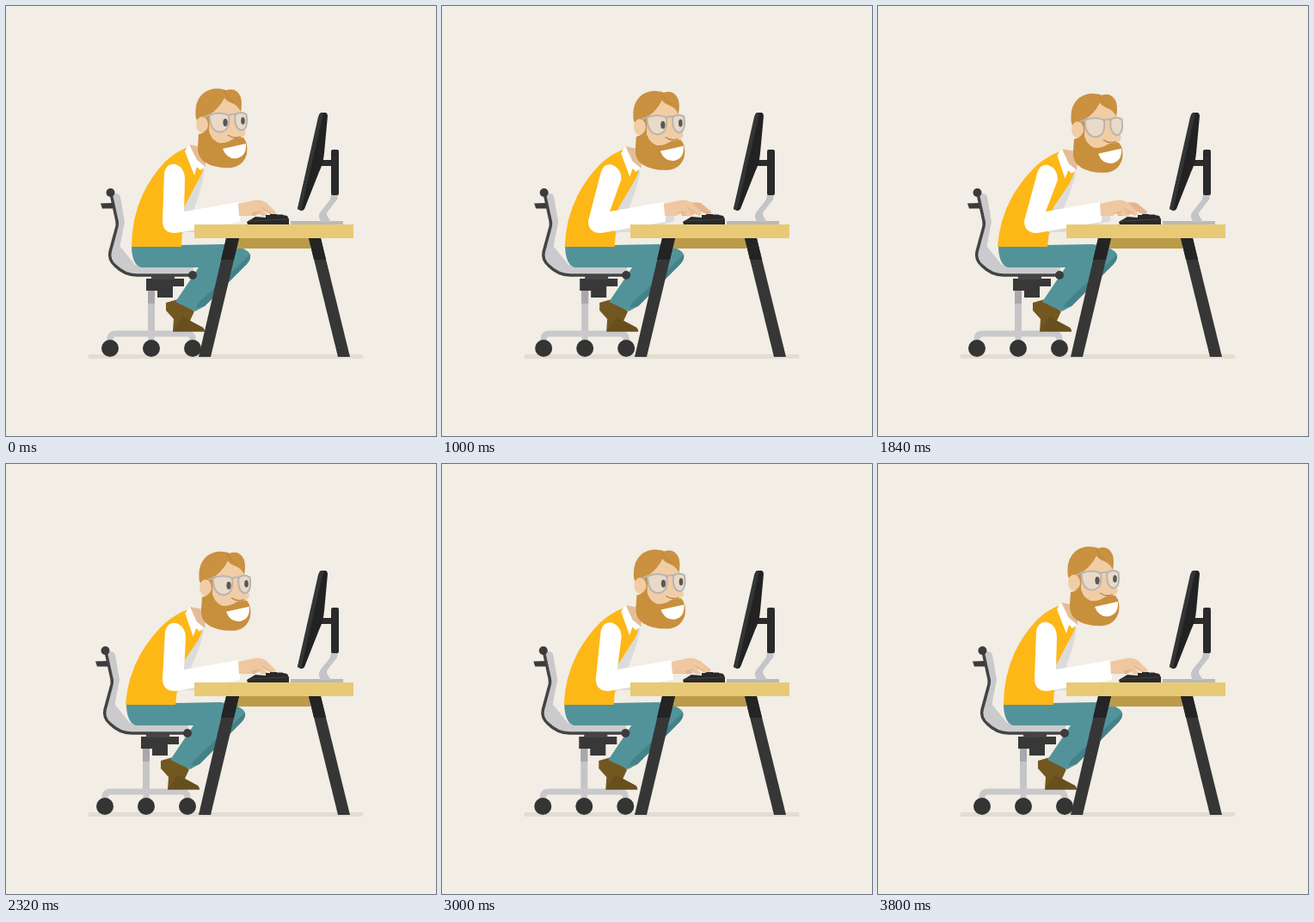
Animation, 500 px wide and 500 px high, one loop 3.84 s. Source, as an HTML page:

```html
<!DOCTYPE html>
<html lang="en">
<head>
<meta charset="utf-8">
<title>At the desk</title>
<style>
html, body { margin: 0; width: 100%; height: 100%; overflow: hidden; background: #f2ede5; }
svg { display: block; width: 100vw; height: 100vh; }
</style>
</head>
<body>
<svg viewBox="0 0 500 500">
  <path d="M98 407.500H413" stroke="#e2dcd1" stroke-width="5" stroke-linecap="round"/>

  <g id="monitor">
    <path d="M331 250H392V254H331Z" fill="#b9b9ba"/>
    <path d="M378 219H386L385 225L374 239Q372 242 374 245L378 251H366L364 246Q363 243 366 239L377 225Z" fill="#c3c4c7"/>
    <rect x="362" y="179" width="20" height="7" fill="#2c2c2d"/>
    <rect x="378" y="167" width="9" height="53" rx="2" fill="#2a2a2b"/>
    <path d="M366 124L372 124Q374 125 374 128L370 171Q369 183 364 193L347 236Q346 238 343 238L339 236Z" fill="#222223"/>
    <path d="M366 124L369 125L343 238L339 236L340 231L363 129Q364 125 366 124Z" fill="#343536"/>
  </g>

  <g id="chair">
    <path d="M124 219Q131 216 133 222L138 251L134 271L131 290Q123 293 123 285L129 255Z" fill="#c9c9cc"/>
    <path d="M122 286L133 280L150 301H218V311H152Q138 311 130 303Q122 296 122 286Z" fill="#cbcbce"/>
    <rect x="165" y="330" width="8" height="50" fill="#c5c5c8"/>
    <path d="M165 331H173V346H165Z" fill="#a8a8ab"/>
    <path d="M121 391V387Q121 381 128 381H210Q217 381 217 387V391M169 380V391" fill="none" stroke="#c9c9cc" stroke-width="7"/>
    <path d="M163 317H207V326H194V339H176V331H163Z" fill="#383839"/>
    <path d="M169 313H196V318H169Z" fill="#454546"/>
    <path d="M122 218L129 250Q130 254 128 260L121 286Q119 295 127 302Q138 313 152 313H216" fill="none" stroke="#434344" stroke-width="3.500"/>
    <circle cx="121.500" cy="217" r="5" fill="#3b3b3c"/>
    <path d="M110 229.500L124 229V235.500H112Z" fill="#3b3b3c"/>
    <g fill="#343435">
      <circle cx="121" cy="398" r="10"/>
      <circle cx="169" cy="398" r="10"/>
      <circle cx="217" cy="398" r="10"/>
    </g>
  </g>

  <g id="legs">
    <path d="M186 345L200 341L219 355L214 366L229 374Q231 376 231 378.500H194L195 364L186 354Z" fill="#735720"/>
    <path d="M206 361L214 366L229 374Q231 376 231 378.500H194L197 373Z" fill="#67501e"/>
    <path d="M146 279L255 277Q274 279 282 286Q287 291 280 300L231 349L220 355L197 344L224 304H157Q146 300 146 279Z" fill="#52939a"/>
    <path d="M284 289Q285 295 280 300L231 349L221 351L225 344Z" fill="#448188"/>
    <circle cx="217" cy="313" r="5" fill="#3b3b3c"/>
  </g>

  <g id="torso">
    <path d="M214 173L231 190Q228 212 218 237L206 265H194Z" fill="#dbdbdc"/>
    <path d="M146 280Q146 247 159 219Q169 198 185 181Q198 169 212 164L229 191Q222 215 206 237L204 280Z" fill="#fdb817"/>
    <path d="M213 160L231 186L226 191L222 187L219 197L208 169Z" fill="#fff"/>
    <path d="M213 161L232 165V187L222 179Z" fill="#e4bd98"/>
  </g>
  <path id="farArm" fill="#dbdbdc"/>

  <g id="head">
    <path d="M233 122L246 108H264L273 119L274 135Q280 146 278 150L270 154L257 172H237L234 146Z" fill="#f1cda6"/>
    <path d="M221 131Q218 111 230 101Q242 93 256 98Q268 94 273 106Q275 114 273 123Q270 116 263 113Q257 111 254 107Q247 120 237 126L236 146H231Z" fill="#c99140"/>
    <path d="M253 97Q257 107 265 112" fill="none" stroke="#bb8233"/>
    <ellipse cx="228" cy="138" rx="7" ry="9.500" fill="#f1cda6"/>
    <path d="M235 141Q237 155 247 159Q254 160 260 157Q268 152 276 153Q282 160 280 172Q276 186 262 188Q243 189 232 182Q222 176 223 163L224 149Q231 148 235 141Z" fill="#c88f3d"/>
    <path d="M252 166L279 160Q280 174 269 177Q257 179 252 166Z" fill="#fff"/>
    <path d="M258 144Q260 153 268 154Q280 153 278 145L272 137H262Z" fill="#f1cda6"/>
    <path d="M258 150Q265 155 273 152" fill="none" stroke="#bd8a50" stroke-width="1.500"/>
    <g stroke="#b8b5b1" stroke-width="2" fill="#e9dac8">
      <path d="M236.500 127Q249 122 259 127Q261 146 249 146.500Q237 146 236.500 127Z"/>
      <path d="M266.500 126Q274 122 279.500 126Q282 143 274 144.500Q265 143 266.500 126Z"/>
      <path d="M231 129L238 126M258 128Q263 124 268 127" fill="none"/>
    </g>
    <g id="eyes" fill="#5c5755">
      <ellipse cx="255" cy="135.500" rx="2.600" ry="4.500"/>
      <ellipse cx="275.500" cy="133.500" rx="2.300" ry="4.300"/>
    </g>
  </g>

  <path id="farHand" d="M276 234Q290 226 301 229L313 239L312 244L299 238L290 244H279Z" fill="#e4b690"/>
  <path id="arm" fill="#fff"/>
  <g id="hand">
    <path d="M270 230L284 227Q295 223 303 229L313 239Q315 243 311 244L298 237L304 243Q302 246 296 243L290 240L285 244L271 244Z" fill="#efc8a1"/>
    <path d="M286 241L296 239M297 234L309 242" fill="none" stroke="#dcac82"/>
  </g>

  <path d="M280 251L290 245L302 246V243H307V242H315V242.500H322V243L327 244L329 248V254H281Z" fill="#292929"/>
  <path d="M282 250L327 248" stroke="#434344" stroke-width="1.200"/>

  <g id="desk">
    <path d="M267 270H354V282H266Z" fill="#bb9b4a"/>
    <path d="M256 270H271L238 408H224Z" fill="#363637"/>
    <path d="M352 270H366L400 408H386Z" fill="#363637"/>
    <path d="M256 270H271L265 295H250ZM352 270H366L372 295H358Z" fill="#242425"/>
    <path d="M219 254H404V270H219Z" fill="#e8ca76"/>
  </g>
</svg>
<script>
const LOOP = 3840;
const el = id => document.getElementById(id);
const [chair, legs, torso, head, eyes, arm, hand, farArm, farHand] =
  ["chair", "legs", "torso", "head", "eyes", "arm", "hand", "farArm", "farHand"].map(el);

// Smooth 0..1 progress between two times
function ease(t, from, to) {
  const u = Math.min(1, Math.max(0, (t - from) / (to - from)));
  return u * u * (3 - 2 * u);
}
// Rises over a..b, falls over c..d
const pulse = (t, a, b, c, d) => ease(t, a, b) - ease(t, c, d);
const move = (node, x, y) => node.setAttribute("transform", `translate(${x} ${y})`);

const blinks = [1800, 2440, 3520];

function draw(t) {
  const lean = pulse(t, 800, 1220, 2840, 3220);
  const reach = -12 * (pulse(t, 640, 900, 1120, 1360)
    + pulse(t, 1480, 1720, 1960, 2200)
    + pulse(t, 2920, 3160, 3360, 3600));
  const far = -10 * (pulse(t, 60, 240, 320, 520)
    + pulse(t, 2300, 2480, 2560, 2760)
    + pulse(t, 2960, 3180, 3360, 3560));

  move(chair, -6 * lean, 0);
  move(legs, -6 * lean, 0);
  move(head, 4 * lean, 5.7 * lean);

  // The waist slides back while the chest drops forward
  const k = lean / 120;
  torso.setAttribute("transform",
    `matrix(1 0 ${-8 * k} ${1 - 5 * k} ${-7 * lean + 2240 * k} ${1400 * k})`);

  const blink = blinks.some(b => t >= b && t < b + 120);
  eyes.setAttribute("visibility", blink ? "hidden" : "visible");

  const fx = far - 3 * lean;
  farArm.setAttribute("d",
    `M${228 + lean} ${194 + 3 * lean}L${212 + fx} 238L${270 + far} 231V250L${224 + fx} 263H${204 - 6 * lean}L${207 + fx} 234Z`);
  move(farHand, far, 0);

  const s = lean, x = n => n + reach;
  arm.setAttribute("d",
    `M${184 + s} ${194 + s}Q${187 + s} ${182 + s} ${197 + s} ${184 + s}` +
    `Q${208 + s} ${188 + s} ${208 + s} ${201 + s}L${x(207)} 239L${x(270)} 228` +
    `Q${x(273)} 239 ${x(272)} 251L${x(197)} 264Q${x(182)} 264 ${x(182)} 250Z`);
  move(hand, reach, 0);
}

function frame(now) {
  draw(now % LOOP);
  requestAnimationFrame(frame);
}
draw(0);
requestAnimationFrame(frame);
</script>
</body>
</html>
```
